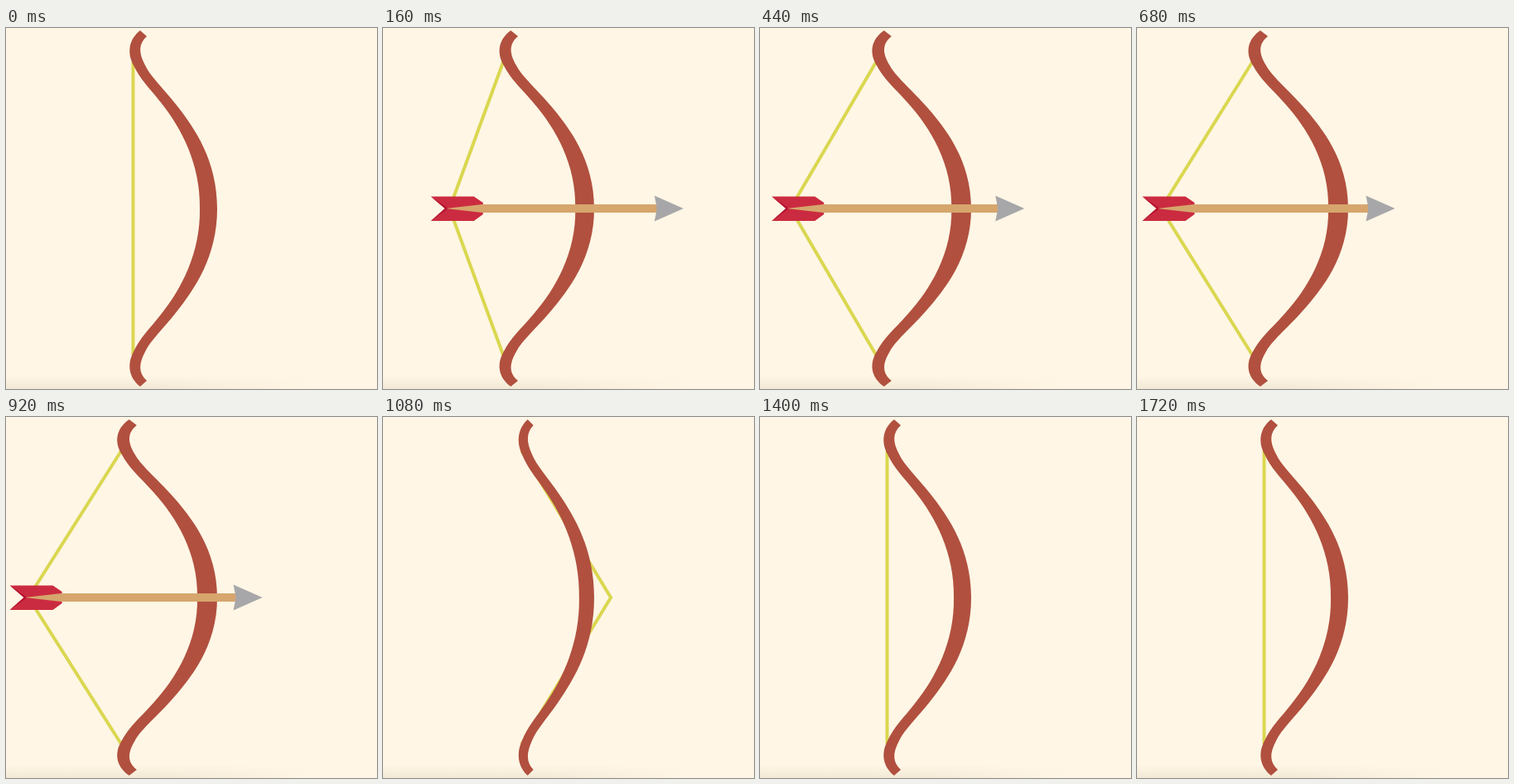
An HTML page for the animation above (1760 ms loop, 448x436 px).

```html
<!DOCTYPE html>
<html lang="en">
<head>
<meta charset="utf-8">
<title>Bow and arrow</title>
<style>
  html, body { margin: 0; width: 100%; height: 100%; overflow: hidden; background: #fff6e5; }
  svg { display: block; width: 100%; height: 100%; }
</style>
</head>
<body>
<svg viewBox="0 0 448 436">
  <defs>
    <linearGradient id="shade" x2="0" y2="1">
      <stop offset="0" stop-color="#e8ddca" stop-opacity="0"/>
      <stop offset="1" stop-color="#e8ddca" stop-opacity=".55"/>
    </linearGradient>
    <linearGradient id="fade">
      <stop offset=".5" stop-color="#fff6e5" stop-opacity="0"/>
      <stop offset="1" stop-color="#fff6e5"/>
    </linearGradient>
    <path id="limb" d="M255 218.5V218C255 160 228 121 205 92C190 73 174 58 168 45
      C160 30 160 19 170 10L162 3C148 14 146 30 154 45C162 62 172 71 187 90
      C212 121 235 165 234 218V218.5Z"/>
  </defs>
  <path fill="url(#shade)" d="M0 420H370V436H0Z"/>
  <path fill="url(#fade)" d="M0 420H371V436H0Z"/>

  <path id="string" fill="none" stroke="#dad750" stroke-width="4"/>
  <g id="bow" fill="#b1503f">
    <use href="#limb"/>
    <use href="#limb" transform="matrix(1 0 0 -1 0 436)"/>
  </g>
  <!-- The arrow's tip is at its local origin. -->
  <g id="arrow">
    <path fill="#cb2b40" d="M-305 -14.5H-253L-242 -7V7L-253 15H-305L-288 0Z"/>
    <path fill="#b3112f" d="M-305 -14.5L-284 0L-305 15L-288 0Z"/>
    <path fill="#d6a66d" d="M-287 0L-243 -5H-31V5H-243Z"/>
    <path fill="#a7a7a9" d="M0 0L-35 -15.5L-32 0L-35 15.5Z"/>
  </g>
</svg>
<script>
  const LOOP = 1760, DRAW_START = 16, RELEASE = 1051.5, SPRING = 280;
  const REST_X = 153.5, PULL = 127, ARROW_LENGTH = 282.5, GRIP_X = 255, MID_Y = 218;
  const [string, bow, arrow] = ["string", "bow", "arrow"].map(id => document.getElementById(id));

  // Elastic recoil from -1 to 0, with amplitude 2 and period 0.3.
  function recoil(p) {
    return p >= 1 ? 0 : 2 * 2 ** (-10 * p) * Math.sin((p - 0.025) * 2 * Math.PI / 0.3);
  }

  // -1 is fully drawn, 0 is at rest.
  function displacement(t) {
    if (t < DRAW_START) return 0;
    if (t < RELEASE) return 2 ** (-(t - DRAW_START) / 117) - 1;
    return recoil((t - RELEASE) / SPRING);
  }

  function render(t) {
    const d = displacement(t);
    const stretch = 1 - d / 7;
    const nockX = REST_X + PULL * d;
    const endX = GRIP_X - (GRIP_X - REST_X) * stretch;
    string.setAttribute("d", `M${endX} 41L${nockX} ${MID_Y}L${endX} 395`);
    bow.setAttribute("transform", `translate(${GRIP_X}) scale(${stretch} 1) translate(${-GRIP_X})`);
    arrow.setAttribute("transform", `translate(${nockX + ARROW_LENGTH} ${MID_Y})`);
    arrow.setAttribute("visibility", t >= DRAW_START && t < RELEASE ? "visible" : "hidden");
  }

  const start = performance.now();
  function tick() {
    render((performance.now() - start) % LOOP);
    requestAnimationFrame(tick);
  }
  tick();
</script>
</body>
</html>
```
